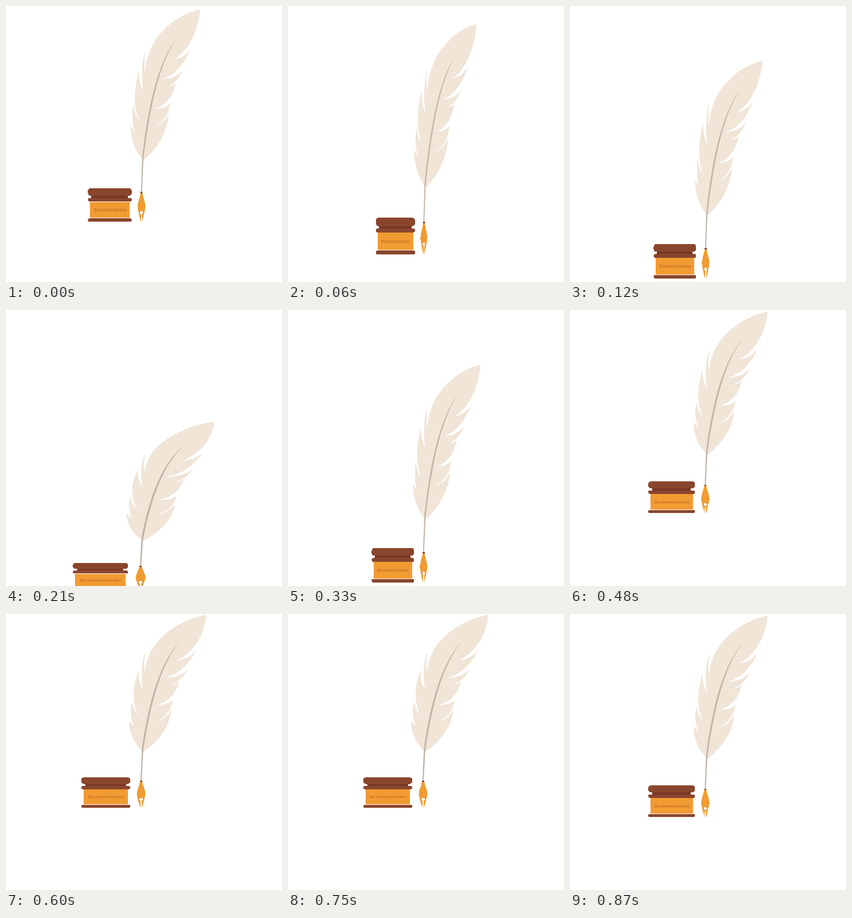
These frames come from a looping animation (480 px wide and 480 px high, 0.9 s). An HTML page:

```html
<!DOCTYPE html>
<html lang="es">
<head>
<meta charset="utf-8">
<title>Bouncing quill and inkwell</title>
<style>
  html, body { margin: 0; width: 100%; height: 100%; overflow: hidden; background: #fff; }
  svg { display: block; width: 100vw; height: 100vh; }
  text { font: 6.3px "Open Sans", sans-serif; fill: #ac5c29; text-anchor: middle; }
  .hard { shape-rendering: crispEdges; }
  .feather { fill: #f0e5d7; }
  .quill { fill: #c0b4a8; }
  .brown { fill: #8a462d; }
  .dark { fill: #783824; }
  .gold { fill: #f19b32; }
  .gap { fill: #fff; }
</style>
</head>
<body>
<svg viewBox="0 0 480 480">
  <g id="scene">
    <path class="feather hard" d="M338 6
      C336 40 320 77 292.5 93 Q311 90 321.5 74
      C315 91 300 118 273 127 Q298 125 308 110
      C305 119 298 133 282.5 139 Q290 139 295.5 133.5
      C292 148 284 171 260.5 178 Q278 178 285.5 169
      C284 184 276 201 258 211 Q275 205 283 187
      C282 216 264 248 239 268
      C226 254 216 232 216.5 207 Q219 214 224 217.5
      C219.5 207 218 188 221.5 170 Q223 189 231.5 198
      C222 180 221 140 232 112 C231 126 233 140 238.5 147
      C235.5 130 235 98 242.5 76 C240 92 240 106 242 118
      C242 60 290 17 338 6Z"/>
    <path class="quill" d="M297.5 56 C265 96 248 170 236.9 262 L234.6 323 H236.5 L239 266 C250 175 267 98 297.5 56Z"/>

    <g class="hard">
      <path class="gold" d="M234 325 H237.4 C239 334 242.6 342 242.6 349 Q240 362 237 374 H234.4 Q231 362 228.8 349 C228.8 342 232.5 334 234 325Z"/>
      <rect class="dark" x="234" y="322.5" width="3.4" height="2.5"/>
      <circle class="gap" cx="235.7" cy="358.5" r="2.5"/>
      <path class="gap" d="M235.1 359 H236.3 L236.7 374.5 H234.7Z"/>

      <rect class="dark" x="148" y="328" width="64" height="6"/>
      <rect class="brown" x="142" y="316" width="76.5" height="13.2" rx="4.8"/>
      <rect class="brown" x="142" y="333" width="76.500" height="6.2" rx="3"/>
      <rect class="gold" x="145.2" y="339.8" width="70" height="27.7"/>
      <rect class="brown" x="142" y="368.5" width="76.5" height="5.7" rx="2.5"/>
    </g>
    <text x="180.5" y="356.3">@CuentistasTardios</text>
  </g>
</svg>
<script>
  const LOOP = 900, STEP = 30, LOW = 225;
  const scene = document.getElementById('scene');

  // Poses by time from the lowest point (ms); the way back mirrors them.
  const height = { 0: 380.5, 300: 216.5, 450: 212.5 };
  const wide = { 0: 1.266, 150: 0.887, 300: 1.103, 450: 1.115 };
  const tall = { 0: 0.785, 150: 1.092, 300: 0.915, 450: 0.907 };

  // Sine ease from pose to pose.
  function pose(track, t) {
    const times = Object.keys(track).map(Number);
    const end = times.findIndex(time => time >= t);
    const i = Math.max(end, 1);
    const a = times[i - 1], b = times[i];
    const ease = (1 - Math.cos(Math.PI * (t - a) / (b - a))) / 2;
    return track[a] + (track[b] - track[a]) * ease;
  }

  function draw(now) {
    const t = Math.floor((now % LOOP) / STEP) * STEP;
    const off = Math.abs(t - LOW);
    const k = Math.min(off, LOOP - off);
    scene.setAttribute('transform',
      `translate(242 ${pose(height, k)}) scale(${pose(wide, k)} ${pose(tall, k)}) translate(-242 -240)`);
  }

  const start = performance.now();
  function tick() {
    draw(performance.now() - start);
    requestAnimationFrame(tick);
  }
  tick();
</script>
</body>
</html>
```
